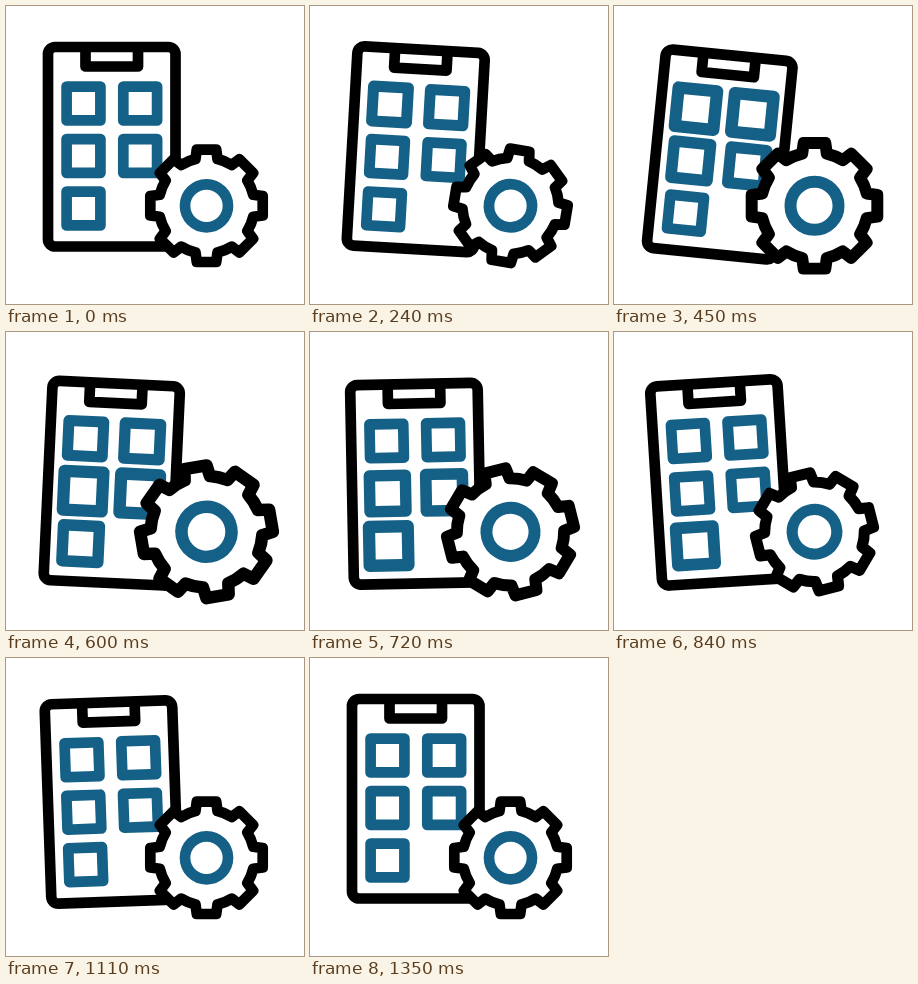
An HTML page that plays this animation: 298 px wide and 298 px high, repeating every 1470 ms.

```html
<!DOCTYPE html>
<html lang="en">
<head>
<meta charset="utf-8">
<title>App settings</title>
<style>
  html, body { margin: 0; width: 100%; height: 100%; overflow: hidden; background: #fff; }
  svg { display: block; width: 100vw; height: 100vh; }
  svg * { fill: none; stroke: #000; stroke-width: 10.7; stroke-linecap: round; stroke-linejoin: round; }
  #apps *, #ring { stroke: #146086; }
  #cog { fill: #fff; }
</style>
</head>
<body>
<svg viewBox="0 0 298 298">
  <g id="phone">
    <rect x="42" y="41" width="127.5" height="199.5" rx="7"/>
    <path d="M79.5 42V60.5H132V42"/>
    <g id="apps"></g>
  </g>
  <g id="gear">
    <path id="cog"/>
    <circle id="ring" r="21.5"/>
  </g>
</svg>
<script>
const LOOP = 1470, STEP = 30, START = 30, END = 1350;
const $ = id => document.getElementById(id);
const phone = $('phone'), gear = $('gear');

const ease = u => (1 - Math.cos(Math.PI * u)) / 2;

// Smooth hump from 0 to 1 and back between two times.
const bump = (t, from, to) =>
  t > from && t < to ? Math.sin(Math.PI * (t - from) / (to - from)) ** 2 : 0;

// Phone leans right, then left, then settles upright.
function tilt(t) {
  const keys = [[START, 0], [420, 5.8], [885, -3.8], [END, 0]];
  const i = keys.findIndex(k => k[0] > t);
  if (i < 1) return 0;
  const [t0, a] = keys[i - 1], [t1, b] = keys[i];
  return a + (b - a) * ease((t - t0) / (t1 - t0));
}

// Gear swings to and fro; longer swings reach further.
function turn(t) {
  const zeros = [START, 450, 1110, END];
  const i = zeros.findIndex(z => z > t);
  if (i < 1) return 0;
  const span = zeros[i] - zeros[i - 1];
  return (i % 2 ? 1 : -1) * 0.0225 * span * Math.sin(Math.PI * (t - zeros[i - 1]) / span);
}

const apps = Array.from({ length: 5 }, (_, i) => {
  const row = i >> 1, col = i % 2, size = 33.8;
  const el = document.createElementNS('http://www.w3.org/2000/svg', 'rect');
  el.setAttribute('x', -size / 2);
  el.setAttribute('y', -size / 2);
  el.setAttribute('width', size);
  el.setAttribute('height', size);
  $('apps').append(el);
  return { el, x: 77.5 + 56.7 * col, y: 97.5 + 52.5 * row, peak: 420 + 160 * row + 20 * col };
});

function cogPath() {
  const root = 48, tip = 56.2, wide = 11, narrow = 9.7;
  const base = Math.sqrt(root * root - wide * wide);
  let d = '';
  for (let i = 0; i < 8; i++) {
    const a = i * Math.PI / 4, c = Math.cos(a), s = Math.sin(a);
    const pt = (x, y) => `${(x * c - y * s).toFixed(2)} ${(x * s + y * c).toFixed(2)}`;
    d += (i ? `A${root} ${root} 0 0 1 ` : 'M') + pt(base, -wide);
    d += `L${pt(tip, -narrow)}L${pt(tip, narrow)}L${pt(base, wide)}`;
  }
  return d + `A${root} ${root} 0 0 1 ${base.toFixed(2)} ${-wide}Z`;
}
$('cog').setAttribute('d', cogPath());

function draw(now) {
  const t = Math.floor((now % LOOP) / STEP) * STEP;
  const drop = 11 * bump(t, START, END);
  phone.setAttribute('transform', `translate(0 ${drop}) rotate(${tilt(t)} 106 141)`);
  for (const { el, x, y, peak } of apps) {
    const size = 1 + 0.15 * bump(t, peak - 260, peak + 260);
    el.setAttribute('transform', `translate(${x} ${y}) scale(${size})`);
  }
  const grow = 1 + 0.165 * bump(t, 210, 960);
  gear.setAttribute('transform', `translate(200.5 199.8) rotate(${turn(t)}) scale(${grow})`);
}

const start = performance.now();
function tick() {
  draw(performance.now() - start);
  requestAnimationFrame(tick);
}
draw(0);
requestAnimationFrame(tick);
</script>
</body>
</html>
```
